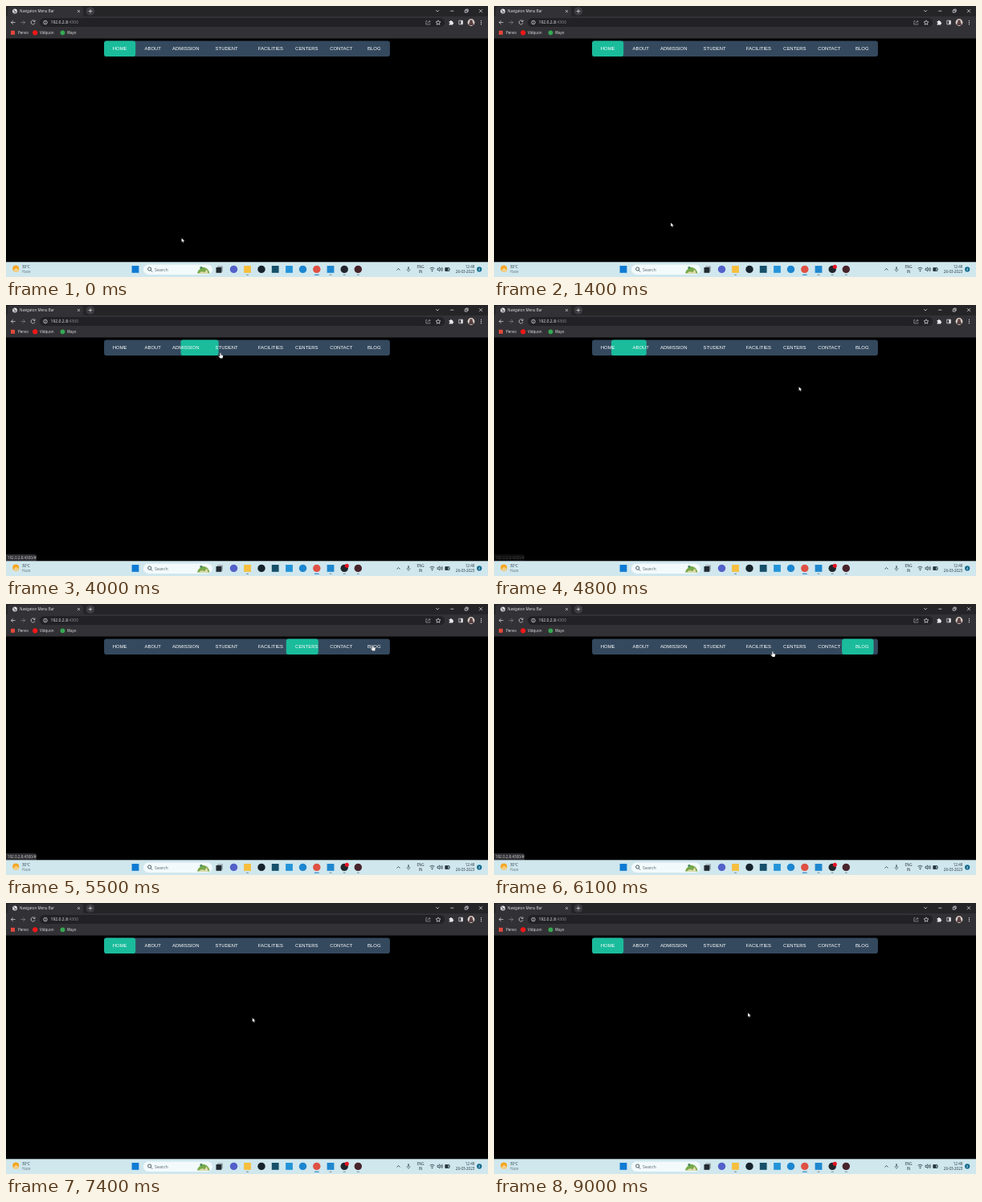
Animation, 600 px wide and 338 px high, one loop 9.1 s. Source, as an HTML page:

```html
<!DOCTYPE html>
<html lang="en">
<head>
<meta charset="utf-8">
<title>Navigation menu</title>
<style>
  html, body { margin: 0; width: 100%; height: 100%; overflow: hidden; background: #000; }
  svg { display: block; width: 100vw; height: 100vh; }
  text { font: 4.5px "Open Sans", "Noto Sans", sans-serif; }
  .light { fill: #e8e8ea; }
  .dark { fill: #22313a; }
  .end { text-anchor: end; }
  .mid { text-anchor: middle; }
  .url { font-size: 5.1px; }
  .line { fill: none; stroke: #d4d4d7; stroke-width: .8; }
  .ink { fill: none; stroke: #26363f; stroke-width: .8; }
  #labels text { font: 5.95px "Liberation Sans", Arial, sans-serif; fill: #fff; text-anchor: middle; }
</style>
</head>
<body>
<svg viewBox="0 0 600 338">
  <rect width="600" height="338"/>

  <!-- browser window -->
  <rect width="600" height="13" fill="#252427"/>
  <rect y="13" width="600" height="27.5" fill="#323135"/>
  <path d="M0 13q2 0 2-2V4q0-3 3-3h88q3 0 3 3v7q0 2 2 2z" fill="#323135"/>
  <circle cx="11" cy="6.5" r="2.9" fill="#e8e8ea"/>
  <path d="M9 5q2 0 2 1.500t2 .5M9.500 8q1.500-1 2.500 .500" fill="none" stroke="#323135" stroke-width=".8"/>
  <text class="light" x="17" y="8.2">Navigaton Menu Bar</text>
  <path class="line" d="M89 5l3 3m0-3l-3 3"/>
  <circle cx="105" cy="6.500" r="5.300" fill="#3d3c40"/>
  <path class="line" d="M102.700 6.500h4.600M105 4.200v4.600"/>
  <path class="line" d="M535.200 5.200l1.900 1.900 1.900-1.900M553.300 6.200h4M589 4.200l4 4m0-4l-4 4M571.200 5.200h2.900v2.900h-2.900zM572.300 5.200V4.100h2.900V7h-1.100"/>

  <rect x="42" y="15" width="504" height="11" rx="5.500" fill="#222125"/>
  <path class="line" d="M11.500 20.500h-5m2.200-2.300l-2.300 2.300 2.300 2.300"/>
  <path class="line" stroke-opacity=".45" d="M18.500 20.500h5m-2.200-2.300l2.300 2.300-2.300 2.300"/>
  <path class="line" d="M35.500 18.800a2.500 2.500 0 1 0 .5 2.400M36 17.500v1.900h-1.900"/>
  <circle class="line" cx="49" cy="20.500" r="2.300"/>
  <path class="line" d="M49 20.200v1.500M49 19v.6"/>
  <text class="light url" x="55.500" y="22.300">192.0.2.8<tspan fill="#8f8f94">:4300</tspan></text>
  <path class="line" stroke-opacity=".6" d="M524.500 18.600h-1.700v4.400h5v-1.500M524.700 21.500q.3-2.300 3.300-2.300m-1.200-1.400l1.400 1.400-1.400 1.400"/>
  <path class="line" d="M538 17.800l.9 1.900 2 .2-1.500 1.400.4 2-1.800-1-1.800 1 .4-2-1.500-1.400 2-.2z"/>
  <path class="light" d="M551.600 19h1.300a1 1 0 0 1 2 0h1.300v1.400a1 1 0 0 1 0 2v1h-4.600v-1.200a.9 .9 0 0 0 0-1.800z"/>
  <path class="line" d="M563.800 18.200h4.600v4.600h-4.600z"/>
  <path class="light" d="M566.300 18.200h2.100v4.600h-2.100z"/>
  <circle cx="579" cy="20.500" r="4.400" fill="#d9cfc8"/>
  <path d="M576.200 24q0-3.500 1.200-4.200a1.800 1.800 0 1 1 3.200 0q1.300 .7 1.300 4.200z" fill="#5a3f42"/>
  <g class="light"><circle cx="591.500" cy="18.300" r=".65"/><circle cx="591.500" cy="20.500" r=".65"/><circle cx="591.500" cy="22.700" r=".65"/></g>

  <rect x="6" y="30.800" width="5" height="5" fill="#e2473c"/>
  <text class="light" x="15" y="35">Penvo</text>
  <circle cx="36.200" cy="33.300" r="3.100" fill="#f01818"/>
  <text class="light" x="42" y="35">Vidquon</text>
  <circle cx="70.500" cy="33.300" r="2.900" fill="#36a853"/>
  <text class="light" x="76" y="35">Wayo</text>

  <!-- page -->
  <rect x="122.100" y="43.400" width="355.800" height="19.600" rx="3.100" fill="#34495e"/>
  <rect id="pill" y="43.400" height="19.600" rx="3.100" fill="#1abc9c"/>
  <g id="labels"></g>
  <g id="status">
    <path d="M0 311h36q2 0 2 2v6.500H0z" fill="#303034"/>
    <text x="1.800" y="317" fill="#d0d0d3" style="font-size:4.6px">192.0.2.8:4300/#</text>
  </g>

  <!-- taskbar -->
  <rect y="319.300" width="600" height="18.700" fill="#d0e7ee"/>
  <circle cx="12.200" cy="327.500" r="4" fill="#f5a623"/>
  <path d="M10 331.500a1.600 1.600 0 0 1 .6-3 2.300 2.300 0 0 1 4.300 .2 1.500 1.500 0 0 1 .6 2.800z" fill="#f3cf86"/>
  <text class="dark" x="20" y="327.300">30°C</text>
  <text x="20" y="333.300" fill="#64757d">Haze</text>
  <rect x="171" y="322.600" width="86" height="12.300" rx="6.100" fill="#f3fafc"/>
  <circle class="ink" cx="178.700" cy="328" r="2.100"/>
  <path class="ink" d="M180.200 329.600l1.900 2"/>
  <text x="185" y="330.700" fill="#52636b" style="font-size:5.3px">Search</text>
  <path d="M238 333.500q1-5 5-6 2-3 5-1 4 1 5.500 7z" fill="#79a94b"/>
  <path d="M240 333.500q4-4 7-1l3-4 1.500 5z" fill="#e6ddb0"/>
  <circle cx="243" cy="326.500" r="1.700" fill="#4f8f5e"/>
  <rect x="263" y="324.300" width="7" height="7" fill="#9eabb2"/>
  <rect x="261.500" y="326" width="6.800" height="6.800" fill="#202a30"/>
  <g id="apps"></g>
  <circle id="badge" cx="424.300" cy="325.200" r="2.500" fill="#e81123"/>

  <path class="ink" d="M486.500 329.500l2-2 2 2"/>
  <rect x="500" y="325" width="2" height="4" rx="1" fill="#71838b"/>
  <path class="ink" stroke-opacity=".6" d="M498.900 328q0 2.400 2.100 2.400t2.100-2.400M501 330.400v1.400"/>
  <text class="dark mid" x="516" y="327.300">ENG</text>
  <text class="dark mid" x="516" y="333.300">IN</text>
  <path class="ink" d="M527.600 327.300q2.900-2.400 5.800 0M528.800 328.900q1.700-1.400 3.400 0"/>
  <circle class="dark" cx="530.500" cy="330.500" r=".8"/>
  <path class="ink" d="M537 327.400h1.200l1.700-1.500v5l-1.700-1.500H537zM541.300 327q1 1.400 0 2.800M542.500 325.800q2 2.600 0 5.200"/>
  <path class="ink" d="M546.800 326.500h5v4h-5zM552.300 327.800v1.400"/>
  <path class="dark" d="M546.800 326.500h3.600v4h-3.600z"/>
  <text class="dark end" x="583.300" y="327.300">12:49</text>
  <text class="dark end" x="583.300" y="333.300">26-03-2023</text>
  <circle cx="589.200" cy="328.400" r="3.100" fill="#126b8d"/>
  <text class="mid" x="589.200" y="329.900" fill="#fff" style="font-size:4px">4</text>

  <g id="cursor" stroke-linejoin="round">
    <path id="arrow" d="M0 0v4.900l1.200-1 .8 1.700 1-.4-.8-1.700h1.600z" fill="#fff" stroke="#222" stroke-width=".25"/>
    <path id="hand" d="M-.8 .7q.8-1.400 1.500 0v2l2 .5q.7 .3 .5 1.300l-.6 2.600h-3l-2.200-2.800q.2-1.200 1.800 .2z" fill="#fff" stroke="#222" stroke-width=".3"/>
  </g>
</svg>
<script>
const $ = id => document.getElementById(id);
const LOOP = 9100, STEP = 100, MOVE = 500, SCALE = .391;

function add(parent, tag, attrs, text = '') {
  const el = document.createElementNS(parent.namespaceURI, tag);
  for (const key in attrs) el.setAttribute(key, attrs[key]);
  el.textContent = text;
  parent.append(el);
}

// menu entries with their CSS widths before scaling
let left = 122.1;
const items = [['HOME', 100], ['ABOUT', 110], ['ADMISSION', 100], ['STUDENT', 160],
  ['FACILITIES', 120], ['CENTERS', 110], ['CONTACT', 110], ['BLOG', 100]].map(([name, w]) => {
  const item = { x: left, w: w * SCALE };
  add($('labels'), 'text', { x: left + item.w / 2, y: 55.1 }, name);
  left += item.w;
  return item;
});

// taskbar apps: centre, shape, colour, width of the running mark
[[161, 'rect', '#0f7bd4'], [283.500, 'circle', '#5361c9'], [300.500, 'rect', '#f6bf3e', 3],
  [318, 'circle', '#17232b'], [335.200, 'rect', '#17506a'], [352.500, 'rect', '#2494d8'],
  [369.500, 'circle', '#1c86cf'], [386.800, 'circle', '#df5144', 6], [404, 'rect', '#1f87cf', 3],
  [421.200, 'circle', '#22262c', 3], [438.300, 'circle', '#48232b', 3]].forEach(([x, shape, fill, mark]) => {
  const box = shape === 'rect' ? { x: x - 4.4, y: 324, width: 8.800, height: 8.800 } : { cx: x, cy: 328.400, r: 4.700 };
  add($('apps'), shape, { ...box, fill });
  if (mark) add($('apps'), 'rect', {
    x: x - mark / 2, y: 334.800, width: mark, height: 1, rx: .5, fill: mark > 3 ? '#1679bd' : '#76878f'
  });
});

// [time, hovered entry], -1 when the pointer is off the menu
const hovers = [[2080, 1], [2140, -1], [2760, 1], [3300, 2], [3890, 3], [4550, -1],
  [5050, 6], [5250, -1], [5350, 7], [6070, 4], [6390, 3], [6700, -1]];
const shown = [[2860, 4550], [5150, 6700]];

// pointer stops: [time, x, y]
const stops = [[0, 218.5, 289.5], [700, 218.5, 289.5], [900, 218, 286], [1300, 218, 286],
  [1800, 228, 207], [1900, 228, 207], [2100, 205, 50], [2200, 194, 17], [2300, 194, 17],
  [2700, 194, 40], [2800, 182, 50], [3200, 196, 54], [3400, 216, 55], [3800, 238, 57],
  [4000, 267, 59.5], [4500, 288, 60], [4600, 322, 84], [4800, 379.5, 102], [5100, 412, 56],
  [5300, 446, 33], [5400, 457, 50], [6000, 455, 58], [6100, 347, 59], [6400, 302, 57],
  [6650, 277, 60], [6800, 269.5, 113], [7000, 288, 156], [7600, 316, 137], [LOOP, 316, 137]];

const clamp = v => Math.max(0, Math.min(1, v));
const mix = (a, b, k) => a + (b - a) * k;

// cubic-bezier(.25, .1, .25, 1)
function ease(p) {
  let lo = 0, hi = 1, u = .5;
  for (let i = 0; i < 20; i++, u = (lo + hi) / 2) {
    if (.75 * u * (1 - u) + u ** 3 < p) lo = u; else hi = u;
  }
  return .3 * u * (1 - u) ** 2 + 3 * u * u * (1 - u) + u ** 3;
}

function pillAt(t) {
  let from = items[0], goal = items[0], start = -MOVE;
  const at = time => {
    const k = ease(clamp((time - start) / MOVE));
    return { x: mix(from.x, goal.x, k), w: mix(from.w, goal.w, k) };
  };
  for (const [time, index] of hovers) {
    if (time > t) break;
    from = at(time);
    goal = items[Math.max(0, index)];
    start = time;
  }
  return at(t);
}

function pointerAt(t) {
  const i = stops.findIndex(s => s[0] > t);
  const a = stops[i - 1], b = stops[i], k = (t - a[0]) / (b[0] - a[0]);
  return [mix(a[1], b[1], k), mix(a[2], b[2], k)];
}

function draw(t) {
  const pill = pillAt(t);
  $('pill').setAttribute('x', pill.x);
  $('pill').setAttribute('width', pill.w);

  const last = hovers.filter(h => h[0] <= t).pop();
  const over = !!last && last[1] >= 0;
  $('cursor').setAttribute('transform', `translate(${pointerAt(t)})`);
  $('arrow').style.display = over ? 'none' : '';
  $('hand').style.display = over ? '' : 'none';

  $('status').style.opacity = Math.max(...shown.map(([a, b]) => t < a ? 0 : clamp((b + 280 - t) / 100)));
  $('badge').style.display = t < 100 ? 'none' : '';
}

const begin = performance.now();
function tick() {
  const t = (performance.now() - begin) % LOOP;
  draw(Math.floor(t / STEP) * STEP);
  requestAnimationFrame(tick);
}
tick();
</script>
</body>
</html>
```
